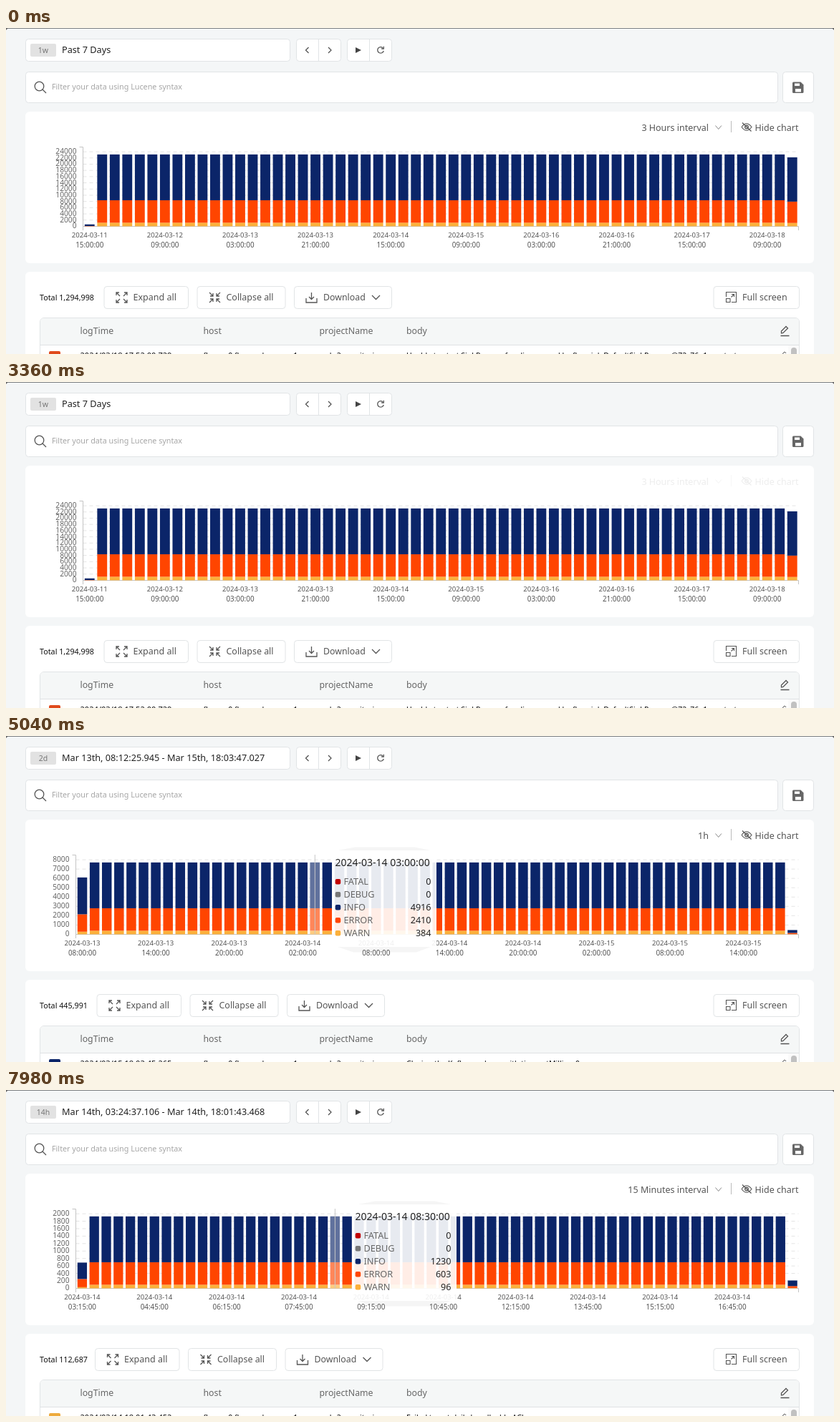
An HTML page for the animation above (8000 ms loop, 1156 by 456 pixels).

```html
<!DOCTYPE html>
<html lang="en">
<head>
<meta charset="utf-8">
<title>Log explorer</title>
<style>
html, body { margin: 0; width: 100%; height: 100%; overflow: hidden; background: #f4f6f7; }
svg { display: block; font-family: "Noto Sans", "Open Sans", sans-serif; }
.btn { fill: #fff; stroke: #e1e4e6; }
.ico { fill: none; stroke: #555; stroke-width: 1.3; }
</style>
</head>
<body>
<svg width="1156" height="456" viewBox="0 0 1156 456">
  <rect width="1156" height="456" fill="#f4f6f7"/>
  <path d="M0 .5H1156" stroke="#7c7f82"/>
  <path d="M0 0h3L0 3zM1156 0h-3l3 3z" fill="#666"/>
  <rect class="btn" x="27.5" y="15.5" width="369" height="31" rx="4"/>
  <g id="range"></g>
  <rect class="btn" x="405.5" y="15.5" width="62" height="31" rx="4"/>
  <rect class="btn" x="476.5" y="15.5" width="62" height="31" rx="4"/>
  <path class="btn" d="M436.5 15.5v31M507.5 15.5v31"/>
  <g id="nav">
    <path class="ico" d="M422.500 27l-4 4 4 4M450 27l4 4-4 4"/>
    <path d="M488 27l8 4-8 4z" fill="#444"/>
    <path class="ico" d="M526 27.700a4.300 4.300 0 1 0 1.200 4.300M527.300 25.800v3.200h-3.200"/>
  </g>
  <rect class="btn" x="27.5" y="61.5" width="1050" height="43" rx="4"/>
  <circle class="ico" cx="46.500" cy="81.500" r="6.300"/>
  <path class="ico" d="M51 86l5 5"/>
  <text x="64" y="85.5" font-size="10.75" fill="#a6a6a6">Filter your data using Lucene syntax</text>
  <rect class="btn" x="1084.5" y="61.5" width="43" height="43" rx="4"/>
  <path d="M1099.500 75.500h10l4 4v10a1.500 1.500 0 0 1-1.500 1.500h-12.500a1.500 1.500 0 0 1-1.500-1.500v-12.500a1.500 1.500 0 0 1 1.500-1.500z" fill="#666"/>
  <path d="M1101 77.500h7v3.500h-7zM1102 85h8v4.500h-8z" fill="#fff"/>
  <rect x="27" y="117" width="1101" height="212" rx="6" fill="#fff"/>
  <rect x="27" y="341" width="1101" height="140" rx="6" fill="#fff"/>
  <g id="ctrl"></g>
  <g id="chart"></g>
  <g id="over"></g>
  <g id="tools"></g>
  <rect class="btn" x="988" y="361.5" width="119.5" height="31" rx="4"/>
  <path class="ico" d="M1005.500 376v-6.500h14v14h-6.500M1005.500 378.500h5.500v5h-5.500zM1012.500 376.500l4-4M1013 372.500h3.500v3.500" style="stroke-width:1.1"/>
  <text x="1028" y="381" font-size="12.5" fill="#555">Full screen</text>
  <g id="table"></g>
  <path class="ico" d="M1081.500 430.500h12M1082.500 427v-3l6.500-6.500 2.500 2.500-6.500 6.500z"/>
</svg>
<script>
const LOOP = 8000, TICK = 70, HOUR = 36e5, RIGHT = 1106.5, BASE = 277.4, TALL = 104.3, FILL = .79;
const NAVY = '#0b2569', ORANGE = '#ff4500', AMBER = '#fbb03b';
const STACK = [AMBER, ORANGE, NAVY];
const $ = id => document.getElementById(id);
const utc = s => Date.parse(s + 'Z');
const mix = (a, b, p) => a + (b - a) * p;
const ease = p => p < .5 ? 4 * p ** 3 : 1 - (2 - 2 * p) ** 3 / 2;

// Value at t on a line through [time, value] points
function along(keys, t) {
  if (t <= keys[0][0]) return keys[0][1];
  for (let i = 1; i < keys.length; i++) {
    const [t0, v0] = keys[i - 1], [t1, v1] = keys[i];
    if (t < t1) return mix(v0, v1, (t - t0) / (t1 - t0));
  }
  return keys[keys.length - 1][1];
}

function text(x, y, s, size, fill, anchor = 'start', extra = '') {
  return `<text x="${x}" y="${y}" font-size="${size}" fill="${fill}" text-anchor="${anchor}" ${extra}>${s}</text>`;
}
function rect(x, y, w, h, fill, extra = '') {
  return `<rect x="${x}" y="${y}" width="${w}" height="${h}" fill="${fill}" ${extra}/>`;
}
const line = (d, color, extra = '') => `<path d="${d}" fill="none" stroke="${color}" ${extra}/>`;

// Bars hold [warn, error, info]
const views = [
  { left: 108, n: 57, start: utc('2024-03-11T15:00:00'), step: 3 * HOUR, max: 24000, tick: 2000,
    first: [20, 80, 520], full: [1152, 7230, 14748], last: [1080, 6870, 14250],
    badge: '1w', range: 'Past 7 Days', interval: '3 Hours interval', total: 'Total 1,294,998', toolX: 137,
    mark: '#e04a1c', time: '2024/03/18 17:52:00.729',
    body: 'Unable to start SinkProcess for clicommand by flowsink.DefaultSinkProcess@72c76a1 : restart' },
  { left: 98, n: 59, start: utc('2024-03-13T08:00:00'), step: HOUR, max: 8000, tick: 1000,
    first: [280, 1870, 3950], full: [384, 2410, 4916], last: [20, 130, 310],
    badge: '2d', range: 'Mar 13th, 08:12:25.945 - Mar 15th, 18:03:47.027', interval: '1h',
    total: 'Total 445,991', toolX: 127,
    mark: NAVY, time: '2024/03/15 18:03:45.265', body: 'Closing the Kafka producer with timeoutMillis = 0' },
  { left: 98, n: 60, start: utc('2024-03-14T03:15:00'), step: HOUR / 4, max: 2000, tick: 200,
    first: [30, 220, 440], full: [96, 603, 1230], last: [10, 50, 150],
    badge: '14h', range: 'Mar 14th, 03:24:37.106 - Mar 14th, 18:01:43.468', interval: '15 Minutes interval',
    total: 'Total 112,687', toolX: 124.5,
    mark: '#eeaa3c', time: '2024/03/14 18:01:43.452', body: 'Failed to get daily bundleable ACL' }
];
const loads = [
  { busy: 3430, data: 3920, anim: 3850, spin: 8 },
  { busy: 6720, data: 7140, anim: 7140, spin: 4 }
];
const drags = [
  { from: 1680, to: 3360, x: 357, start: utc('2024-03-13T08:12:25'), perHour: 5.928, lag: 70,
    path: [[1680, 357], [1820, 385], [1960, 460], [2030, 510.2], [2100, 545], [2170, 545], [2240, 565],
      [2660, 672], [2730, 672], [2800, 680], [2940, 700]] },
  { from: 5320, to: 6650, x: 433, start: utc('2024-03-14T03:24:37'), perHour: 17.375, lag: 140,
    path: [[5390, 433], [5600, 484], [5670, 484], [5740, 496], [5880, 496], [5950, 530], [6230, 687]] }
];
const hovers = [
  { from: 1120, to: 1680, path: [[1120, 365], [1190, 357]] },
  { from: 4480, to: 5320, path: [[4480, 525], [4620, 455], [4760, 455], [4900, 450], [4970, 450], [5040, 433]] },
  { from: 7700, to: LOOP, path: [[7700, 428], [7980, 461]] }
];
const fades = {
  ctrl: [[1680, 1], [1960, .1], [3430, .1], [3570, .4], [3850, .4], [4130, 1], [5320, 1], [5600, .1],
    [6650, .1], [6790, .4], [7140, .4], [7420, 1]],
  chart: [[3360, 1], [3570, .3], [3850, .3], [4130, 1], [6650, 1], [6860, .3], [7140, .3], [7420, 1]],
  table: [[3360, 1], [3570, .35], [3850, .35], [4060, 1], [6650, 1], [6860, .35], [7070, .35], [7140, .6], [7350, 1]]
};

const band = v => (RIGHT - v.left) / v.n;
const center = (v, k) => v.left + (k + .5) * band(v);
const rise = (v, n) => TALL * n / v.max;
const bar = (v, i) => i === 0 ? v.first : i === v.n - 1 ? v.last : v.full;
const stamp = ms => new Date(ms).toISOString().slice(0, 19).split('T');

function drawChart(a, b, p) {
  const axis = mix(a.left, b.left, p) - .5;
  let s = '';
  for (let n = 0; n <= b.max; n += b.tick) {
    const y = BASE - mix(rise(a, n), rise(b, n), p);
    if (n) s += line(`M${axis} ${y}H${RIGHT}`, '#e4e4e4', 'stroke-dasharray="5 4"');
    s += text(axis - 9, y + 3, n, 10.2, '#666', 'end');
  }
  s += line(`M${axis - 5} 166.5H${axis}V283M${axis} 277.5H${RIGHT}V283`, '#c4c4c4');
  for (let i = 0; i < b.n; i++) {
    const old = i < a.n, w = FILL * mix(band(a), band(b), p);
    const x = (old ? mix(center(a, i), center(b, i), p) : center(b, i)) - w / 2;
    let y = BASE;
    bar(b, i).forEach((n, k) => {
      const h = mix(old ? rise(a, bar(a, i)[k]) : 0, rise(b, n), p);
      y -= h;
      s += rect(x.toFixed(2), y.toFixed(2), w.toFixed(2), h.toFixed(2), STACK[k]);
    });
  }
  for (let k = 0; k < b.n - 2; k += 6) {
    const ms = b.start + k * b.step;
    const x = mix(center(a, Math.floor((ms - a.start) / a.step)), center(b, k), p);
    const [day, time] = stamp(ms);
    s += text(x, 293, day, 9.6, '#555', 'middle') + text(x, 306.5, time, 9.9, '#555', 'middle');
  }
  return s;
}

function drawSpinner(angle) {
  return [.9, .5, .55, .35].map((o, i) => {
    const r = (angle + i * 90) * Math.PI / 180;
    return `<circle cx="${577.5 + 7.8 * Math.cos(r)}" cy="${223 + 7.8 * Math.sin(r)}" r="3.4" fill="#1b2a66" opacity="${o}"/>`;
  }).join('');
}

function drawTip(v, mouse) {
  const k = Math.floor((mouse - v.left) / band(v)), mid = center(v, k), w = FILL * band(v);
  const vals = bar(v, k), h = rise(v, vals[0] + vals[1] + vals[2]), x = mouse + 22;
  let s = rect(mid - w / 2, BASE - h, w, h, '#fff', 'opacity=".35"');
  s += line(`M${mid} 166V277`, '#c8c8c8');
  s += `<path d="M${x + 8} 160L${x + 32} 155.5H${x + 116}L${x + 138} 160zM${x + 8} 295L${x + 30} 302.5H${x + 118}L${x + 138} 295z" opacity=".04"/>`;
  s += rect(x, 160, 146, 135, '#fff', 'rx="3" opacity=".9"');
  s += text(x + 4.5, 181.5, stamp(v.start + k * v.step).join(' '), 14, '#222');
  [['FATAL', '#c00000', 0], ['DEBUG', '#777', 0], ['INFO', NAVY, vals[2]], ['ERROR', ORANGE, vals[1]], ['WARN', AMBER, vals[0]]]
    .forEach(([name, color, n], i) => {
      const y = 207.5 + 18 * i;
      s += rect(x + 4.7, y - 7.5, 7.5, 7.5, color, 'rx="2"') + text(x + 16.5, y, name, 12.7, '#666') +
        text(x + 138.5, y, n, 12.6, '#222', 'end');
    });
  return s;
}

function drawDrag(d, t) {
  const x = along(d.path, t), end = d.start + (along(d.path, t - d.lag) - d.x) / d.perHour * HOUR;
  const label = (ms, px, anchor) => stamp(ms).map((part, i) =>
    text(px, 140.5 + 11.5 * i, part.replace(/-/g, '.'), 10.8, '#222', anchor,
      'font-family="Liberation Sans, Arial, sans-serif"')).join('');
  return rect(d.x, 159, x - d.x, 152, '#000', 'opacity=".1"') +
    line(`M${d.x + .5} 159V311M${x + .5} 159V311`, '#111') +
    label(d.start, d.x + .5, 'start') + label(end, x + .5, 'end');
}

function drawCtrl(v) {
  return text(981, 143.5, v.interval, 12.5, '#555', 'end') +
    line('M990.5 136.500l4.200 5 4.200-5', '#888') +
    line('M1012.5 130V146', '#bbb') +
    line('M1027 138.500q7-9.500 14 0q-7 9.500-14 0M1028 132.500l12.500 12', '#555', 'stroke-width="1.2"') +
    '<circle cx="1034" cy="138.5" r="2.3" class="ico"/>' + text(1045.5, 143.5, 'Hide chart', 12.5, '#555');
}

function drawTools(label, x) {
  const box = (dx, w) => `<rect class="btn" x="${x + dx}" y="361.5" width="${w}" height="31" rx="4"/>`;
  const icon = (dx, d) => `<path class="ico" transform="translate(${x + dx} 369)" d="${d}"/>`;
  const name = (dx, s, size) => text(x + dx, 381, s, size, '#555');
  return text(47, 381, label, 10.75, '#111') + box(0, 117.5) + box(130, 123) + box(265.5, 136) +
    icon(16, 'M1 5V1h4M1 1l5 5M12 1h4v4M16 1l-5 5M1 11v4h4M1 15l5-5M16 11v4h-4M16 15l-5-5') + name(40.5, 'Expand all', 12.5) +
    icon(146, 'M6 2v4h-4M6 6l-5-5M11 2v4h4M11 6l5-5M6 14v-4h-4M6 10l-5 5M11 14v-4h4M11 10l5 5') + name(170.5, 'Collapse all', 12.45) +
    icon(281, 'M1 9v6h15v-6M8.5 1v9M5 7l3.500 3.500 3.500-3.500') + name(306, 'Download', 12.35) +
    icon(373, 'M1 5l5.500 5.500 5.500-5.500');
}

function drawTable(v, busy) {
  let s = busy ? '' : '<path d="M47.5 460V411a5.500 5.500 0 0 1 5.500-5.500H1102a5.500 5.500 0 0 1 5.500 5.500V460" fill="#fff" stroke="#e1e4e6"/>' +
    '<path d="M48 443V411a5 5 0 0 1 5-5H1102a5 5 0 0 1 5 5V443z" fill="#f5f7f7"/>';
  s += line('M47 443.5H1107', '#dfe2e4');
  s += [[103.5, 'logTime'], [275.5, 'host'], [437.5, 'projectName'], [559, 'body']]
    .map(([x, name]) => text(x, 427.5, name, 12.3, '#666')).join('');
  if (busy) return s;
  return s + rect(60, 452, 16, 12, v.mark, 'rx="2"') + text(103.5, 461.5, v.time, 11.1, '#111') +
    text(275.5, 461.5, 'flower-0.flower-demo-vm1', 10.6, '#111') + text(437.5, 461.5, 'web-2-monitoring', 10.6, '#111') +
    text(559, 461.5, v.body, 10.5, '#111') + line('M1083 458l3-4.500q2-1 3 1.500', '#555') +
    rect(1092, 444, 15, 14, '#fafafa') + rect(1096, 447, 8, 20, '#c1c1c1', 'rx="4"');
}

const active = (list, t) => list.find(e => t >= e.from && t < e.to);

function render(t) {
  const shown = loads.filter(l => t >= l.data).length;
  const asked = loads.filter(l => t >= l.busy).length;
  const busy = asked > shown, v = views[shown], next = views[asked];
  const load = loads[busy ? shown : shown - 1];
  const p = !busy && load ? Math.min(1, (t - load.anim) / 280) : 1;
  const prev = shown && p < 1 ? views[shown - 1] : v;

  $('range').innerHTML = rect(34, 22, 36, 18, '#e2e2e2', 'rx="2"') + text(52, 34.8, next.badge, 10.5, '#777', 'middle') +
    text(78, 34.5, next.range, 12.7, '#222');
  $('range').setAttribute('opacity', busy ? .5 : 1);
  $('nav').setAttribute('opacity', busy ? .5 : 1);

  $('ctrl').innerHTML = drawCtrl(next);
  $('chart').innerHTML = drawChart(prev, v, ease(p));
  $('table').innerHTML = drawTable(v, busy);
  for (const id in fades) $(id).setAttribute('opacity', along(fades[id], t));

  const hover = active(hovers, t), drag = active(drags, t);
  let over = '';
  if (hover) over = `<g opacity="${t === hover.from ? .6 : 1}">${drawTip(v, along(hover.path, t))}</g>`;
  if (drag) over = drawDrag(drag, t);
  if (busy || p < 1) over = `<g opacity="${busy ? 1 : 1 - p}">${drawSpinner(load.spin + .3 * (t - load.anim))}</g>`;
  $('over').innerHTML = over;

  $('tools').innerHTML = drawTools(busy ? 'Loading...' : v.total, busy ? 109.5 : v.toolX);
}

let last = -1;
function frame() {
  const t = Math.floor(performance.now() % LOOP / TICK) * TICK;
  if (t !== last) render(last = t);
  requestAnimationFrame(frame);
}
frame();
</script>
</body>
</html>
```
